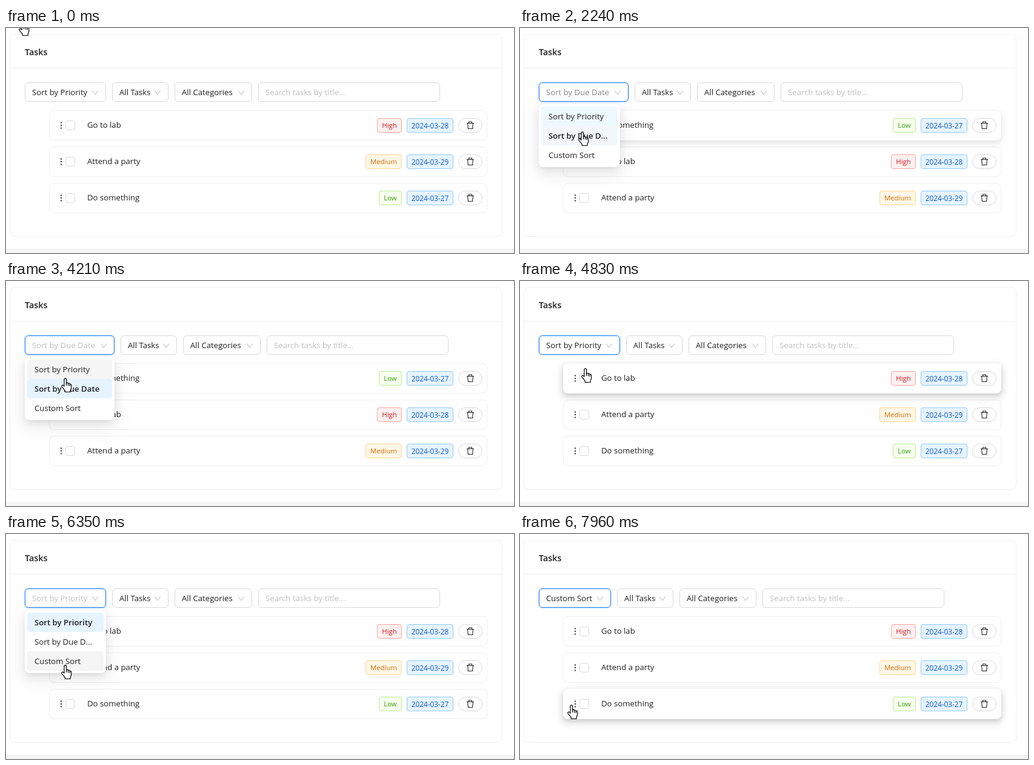
Recreate the animation shown at these times as an HTML page. Size 838 by 372 pixels, loop 8 s.

```html
<!DOCTYPE html>
<html lang="en">
<head>
<meta charset="utf-8">
<title>Tasks</title>
<style>
html, body { margin: 0; width: 100%; height: 100%; overflow: hidden; background: #fff; }
body { position: relative; font: 13.2px/22px "Open Sans", "Noto Sans", sans-serif; color: rgba(0,0,0,.88); }
div, svg { position: absolute; box-sizing: border-box; white-space: nowrap; }
svg { fill: none; overflow: visible; }
.card { left: 6px; top: 10px; width: 813px; height: 335px; border: 1px solid #f0f0f0; border-radius: 8px; }
.head { left: 0; top: 0; width: 811px; height: 56px; border-bottom: 1px solid #f0f0f0; padding-left: 24px; font: 600 14.4px/57px "Open Sans", "Noto Sans", sans-serif; }
.foot { left: 0; top: 365px; width: 100%; height: 7px; background: #f5f5f5; }
.field { top: 90px; height: 32px; border: 1px solid #d9d9d9; border-radius: 6px; padding-left: 11px; line-height: 30px; background: #fff; }
.field svg { right: 11px; top: 10px; stroke: #b5b5b5; }
#search { width: 300px; color: #bfbfbf; }
.row { left: 71px; width: 723px; height: 50px; border: 1px solid #f0f0f0; border-radius: 8px; background: #fff; }
.row svg { left: 0; top: 0; }
.check { left: 26px; top: 16px; width: 16px; height: 16px; border: 1px solid #d9d9d9; border-radius: 4px; }
.title { left: 62px; top: 12px; }
.tag { top: 12px; height: 24px; border: 1px solid; border-radius: 4px; text-align: center; font-size: 11.4px; }
.date { left: 589px; width: 77px; font-size: 11.8px; color: #0958d9; background: #e6f4ff; border-color: #91caff; }
.del { left: 674px; top: 12px; width: 40px; height: 24px; border: 1px solid #d9d9d9; border-radius: 12px; }
#menu { left: 31px; top: 126px; height: 104px; border-radius: 8px; background: #fff; transform-origin: 0 0;
  box-shadow: 0 6px 16px rgba(0,0,0,.08), 0 3px 6px -4px rgba(0,0,0,.12), 0 9px 28px 8px rgba(0,0,0,.05); }
.option { left: 4px; right: 4px; height: 32px; padding: 0 12px; border-radius: 4px; line-height: 32px; }
.option span { display: block; overflow: hidden; text-overflow: ellipsis; }
#hand { left: 0; top: 0; }
</style>
</head>
<body>
<div class="card"><div class="head">Tasks</div></div>
<div class="foot"></div>
<div class="field" id="search">Search tasks by title...</div>
<script>
const TICK = 89.4, LOOP = 8000;
const modes = [
  { name: 'Sort by Priority', width: 134, catWidth: 128, order: [0, 1, 2] },
  { name: 'Sort by Due Date', width: 148, catWidth: 128, order: [2, 0, 1] },
  { name: 'Custom Sort', width: 119, catWidth: 127, order: [0, 1, 2] }
];
const tasks = [
  ['Go to lab', 'High', 41, '#cf1322', '#fff1f0', '#ffa39e', '2024-03-28'],
  ['Attend a party', 'Medium', 60, '#d46b08', '#fff7e6', '#ffd591', '2024-03-29'],
  ['Do something', 'Low', 38, '#389e0d', '#f6ffed', '#b7eb8f', '2024-03-27']
];
// Pointer path: tick, x, y
const path = [
  [1, 21, -11], [7, 102, 110], [15, 102, 110], [19, 96, 171], [26, 96, 171], [32, 135, 94],
  [33, 135, 94], [34, 132, 94], [35, 132, 94], [36, 129, 98], [38, 129, 98], [46, 100, 161],
  [47, 91, 160], [49, 89, 148], [53, 89, 148], [57, 168, 125], [58, 168, 125], [62, 120, 107],
  [64, 120, 107], [71, 91, 216], [75, 91, 216], [83, 80, 273], [85, 69, 294], [86, 69, 294], [89, 78, 282]
];

function add(html) {
  document.body.insertAdjacentHTML('beforeend', html);
  return document.body.lastElementChild;
}
const field = label => add(`<div class="field"><span>${label}</span>
  <svg width="12" height="12"><path d="M1.2 2.5 6 9 10.8 2.5"/></svg></div>`);

const search = document.getElementById('search');
const sort = field(''), filter = field('All Tasks'), category = field('All Categories');
const rows = tasks.map(([title, level, width, ink, fill, edge, date]) => add(`<div class="row">
  <div class="check"></div><div class="title">${title}</div>
  <div class="tag" style="right:140px;width:${width}px;color:${ink};background:${fill};border-color:${edge}">${level}</div>
  <div class="tag date">${date}</div><div class="del"></div>
  <svg width="721" height="48"><path d="M18 18.5h2v2h-2zM18 23h2v2h-2zM18 27.5h2v2h-2z" fill="#333"/>
  <path d="M688 20.5h12M691.5 20v-2h5v2M689.7 21l.6 8.5h7.4l.6-8.5" stroke="#222" stroke-width="1.1"/></svg></div>`));
const menu = add(`<div id="menu">${modes.map((m, i) =>
  `<div class="option" style="top:${4 + 32 * i}px"><span>${m.name}</span></div>`).join('')}</div>`);
const options = [...menu.children];
const hand = add(`<svg id="hand" width="18" height="25" stroke="#000" stroke-width="1.2" stroke-linejoin="round">
  <path fill="#fff" d="M5 14V2.5C5 .2 8.6.2 8.6 2.5V9C9.5 7.8 11.4 8.2 11.7 9.6 12.8 8.7 14.2 9.3 14.4 10.6 15.6 10 16.8 10.8 16.8 12.2V16C16.8 18.5 15 20 15 22V23.5H6.5V22C5.5 19.5 2.5 17 1 14.5 0 12.6 2.3 11.4 3.6 12.8Z"/>
  <path d="M8.6 9v4M11.7 10v3.5M14.4 11v3"/></svg>`);

const modeAt = n => n < 25 ? 0 : n < 52 ? 1 : n < 74 ? 0 : 2;
const isOpen = n => [[11, 25], [38, 52], [64, 74]].some(([a, b]) => n >= a && n < b);

function pointer(n) {
  const i = path.findIndex(k => k[0] >= n);
  if (i < 1) return path[i ? path.length - 1 : 0].slice(1);
  const [a, x, y] = path[i - 1], [b, u, v] = path[i];
  const p = (n - a) / (b - a), e = p * p * (3 - 2 * p);
  return [x + (u - x) * e, y + (v - y) * e];
}
function over(n, left, top, width, height) {
  const [x, y] = pointer(n);
  return x + 6 >= left && x + 6 < left + width && y >= top && y < top + height;
}
// Fades a true/false state over the last few ticks
function fade(n, test, ticks = 3) {
  let sum = 0;
  for (let k = 0; k < ticks; k++) sum += test(n - k);
  return sum / ticks;
}

function draw(n) {
  const mode = modes[modeAt(n)];
  let x = 31;
  [[sort, mode.width], [filter, 93], [category, mode.catWidth], [search, 300]].forEach(([box, width]) => {
    box.style.left = x + 'px';
    box.style.width = width + 'px';
    x += width + 10;
  });
  const focused = n >= 11;
  sort.firstChild.textContent = mode.name;
  sort.firstChild.style.color = `rgba(0,0,0,${.88 - .63 * fade(n, isOpen)})`;
  sort.style.borderColor = focused ? '#1677ff' : over(n, 31, 90, mode.width, 32) ? '#4096ff' : '#d9d9d9';
  sort.style.boxShadow = focused ? '0 0 0 2px rgba(5,145,255,.1)' : 'none';

  mode.order.forEach((task, slot) => {
    const top = 136 + 60 * slot, style = rows[task].style;
    const h = fade(n, k => !isOpen(k) && over(k, 71, top, 723, 50), 2);
    style.top = top + 'px';
    style.zIndex = h ? 1 : 0;
    style.borderColor = `rgba(240,240,240,${1 - h})`;
    style.boxShadow = `0 1px 2px -2px rgba(0,0,0,${.16 * h}), 0 3px 6px rgba(0,0,0,${.12 * h}), 0 5px 12px 4px rgba(0,0,0,${.09 * h})`;
  });

  const shown = fade(n - 1, isOpen, 2), width = modes[modeAt(n - 2)].width;
  menu.style.cssText = `z-index:2;width:${width}px;opacity:${shown};transform:scaleY(${.8 + .2 * shown})`;
  options.forEach((option, i) => {
    const picked = fade(n, k => modeAt(k) === i);
    const hover = 10 * (1 - picked) * fade(n, k => isOpen(k) && over(k, 35, 130 + 32 * i, width - 8, 32));
    option.style.fontWeight = modeAt(n) === i ? 600 : 400;
    option.style.background = `rgb(${255 - 25 * picked - hover},${255 - 11 * picked - hover},${255 - hover})`;
  });

  const [px, py] = pointer(n);
  hand.style.cssText = `z-index:3;transform:translate(${Math.round(px)}px,${Math.round(py)}px)`;
}

const start = performance.now();
function loop() {
  draw(Math.floor((performance.now() - start) % LOOP / TICK));
  requestAnimationFrame(loop);
}
loop();
</script>
</body>
</html>
```
